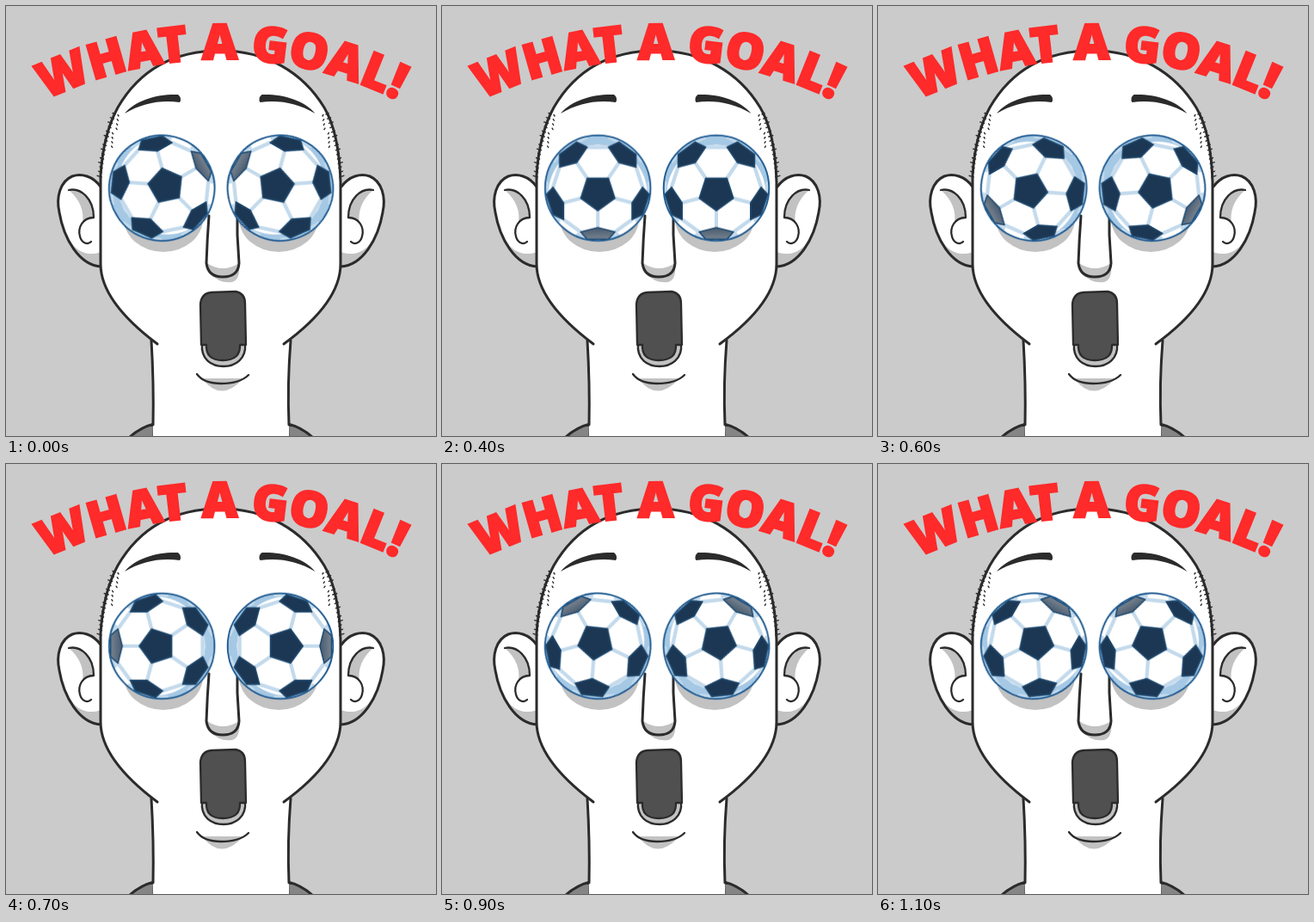
An HTML page that plays this animation: 500x500 px, repeating every 1.2 s.

```html
<!DOCTYPE html>
<html lang="en">
<head>
<meta charset="utf-8">
<title>What a goal!</title>
<style>
  html, body { margin: 0; width: 100%; height: 100%; overflow: hidden; background: #cbcbcb; }
  svg { display: block; width: 100vw; height: 100vh; }
  .line { fill: none; stroke: #2b2b2b; stroke-width: 3; stroke-linecap: round; stroke-linejoin: round; }
  .thin { stroke-width: 2.3; }
  .hair { stroke-width: 1.4; }
  .skin { fill: #fff; }
  .shade { fill: #c2c2c2; }
  .ink { fill: #2b2b2b; }
  .shout {
    font: 800 57px "Open Sans", "Noto Sans", sans-serif;
    text-anchor: middle;
    fill: #ff2a2a;
    stroke: #ff2a2a;
    stroke-width: 2.4;
  }
  .spin { animation: spin 1.2s steps(12, end) infinite; }
  @keyframes spin {
    from { transform: rotate(60deg); }
    to { transform: rotate(420deg); }
  }
</style>
</head>
<body>
<svg viewBox="0 0 500 500">
  <defs>
    <linearGradient id="leather" gradientUnits="userSpaceOnUse" x1="0" y1="-61" x2="0" y2="-34">
      <stop offset="0" stop-color="#7d8792"/>
      <stop offset="1" stop-color="#1c3753"/>
    </linearGradient>
    <clipPath id="rim"><circle r="61"/></clipPath>
    <path id="arc" d="M10 129A465 465 0 0 1 491 129"/>

    <g id="ball">
      <circle r="61.3" fill="#a5c8e4"/>
      <g clip-path="url(#rim)">
        <circle cy="-7" r="57.5" fill="#fff"/>
        <g fill="none">
          <path id="seams" stroke="#c3daec" stroke-width="4"/>
          <use href="#seams" style="stroke:#5486b0;stroke-width:1.5"/>
        </g>
        <path id="patches" fill="url(#leather)" stroke="#1f4a70" stroke-width="1.6" stroke-linejoin="round"/>
      </g>
      <circle r="61.3" fill="none" stroke="#1f5a90" stroke-width="1.9"/>
    </g>

    <g id="ear">
      <path class="skin" d="M112 211C101 198 88 194 77 198C63 204 58 222 62 240C67 270 85 302 112 303Z"/>
      <path class="shade" d="M73 214C87 211 102 224 102 246C96 246 92 249 89 254C91 239 87 226 73 214Z"/>
      <path class="shade" d="M76 276C87 289 98 290 112 286V303C98 303 85 294 76 276Z"/>
      <path class="line" d="M110 210C101 198 88 194 77 198C63 204 58 222 62 240C67 270 85 302 111 303"/>
      <path class="line thin" d="M73 214C87 211 102 224 102 246C89 246 83 258 86 268C88 276 95 278 99 274"/>
    </g>

    <path id="brow" class="ink" d="M138 125C151 109 177 102 200 103Q205 107 202 112C180 109 158 113 138 125Z"/>
  </defs>

  <rect width="500" height="500" fill="#cbcbcb"/>

  <path class="line" style="fill:#858585" d="M143 502Q156 490 172 486V502ZM357 502Q344 490 328 486V502Z"/>

  <use href="#ear"/>
  <use href="#ear" transform="translate(500 0) scale(-1 1)"/>

  <path class="skin" d="M171 502L169 387C140 364 110 334 110 300V197C112 166 118 140 130 118C155 75 195 52 249 52C303 52 345 77 370 118C383 140 388 168 389 205V300C389 334 360 366 331 389L329 502Z"/>
  <path class="line" d="M176 393C140 366 110 334 110 300V197C112 166 118 140 130 118C155 75 195 52 249 52C303 52 345 77 370 118C383 140 388 168 389 205V300C389 334 360 366 323 393"/>
  <path class="line" d="M169 389Q172 440 171 487M331 389Q327 440 329 487"/>
  <path id="stubble" class="line hair"/>

  <use href="#brow"/>
  <use href="#brow" transform="translate(497.5 0) scale(-1 1)"/>

  <path class="shade" d="M234 299Q252 311 271 299Q273 318 263 321Q248 323 237 311Z"/>
  <path class="line" d="M236 244Q234 270 233 299Q235 315 252 315Q270 315 271 299L269 266V244"/>

  <path class="shade" d="M228 392H278C280 411 266 419 253 419C239 419 226 411 228 392Z"/>
  <path class="line thin" d="M228 392C226 411 239 419 253 419C266 419 280 411 278 392"/>
  <path class="line thin" style="fill:#505050" d="M227 394L226 347Q227 334 239 333L267 332Q278 334 278 346L279 394H272Q273 412 252 412Q232 412 233 394Z"/>

  <path class="shade" d="M228 433Q250 462 276 433Z"/>
  <path class="line thin" d="M222 428Q230 439 250 439Q272 439 282 429"/>

  <ellipse class="shade" cx="183" cy="247" rx="46" ry="39"/>
  <ellipse class="shade" cx="317" cy="247" rx="46" ry="39"/>

  <g transform="translate(181.2 211.7)"><use href="#ball" class="spin"/></g>
  <g transform="translate(319 211.7) scale(-1 1)"><use href="#ball" class="spin"/></g>

  <text class="shout"><textPath href="#arc" startOffset="50%">WHAT A GOAL!</textPath></text>
</svg>
<script>
  const byId = id => document.getElementById(id);

  // Short hairs along both temples, with a few strays further in.
  let hairs = "";
  const hair = (x, y, len) => {
    hairs += `M${x} ${y}l${-len} -1.5M${499 - x} ${y}l${len} -1.5`;
  };
  for (let i = 0; i < 15; i++) {
    const y = 126 + i * 5.2;
    const x = 110 + 16 * ((202 - y) / 76) ** 1.6;
    hair(x + 1, y, 3 + i * 7 % 3);
    if (i < 8) hair(x + 5 + i * 5 % 4, y + 2, 1);
  }
  byId("stubble").setAttribute("d", hairs);

  // The ball is a truncated icosahedron, tilted a little and seen from the front.
  const RAD = Math.PI / 180;
  const R = 61, TILT = 0.095, POLE = Math.atan(2);
  const place = (polar, azimuth) => {
    const x = Math.sin(polar) * Math.sin(azimuth);
    const y = -Math.sin(polar) * Math.cos(azimuth);
    const z = Math.cos(polar);
    return [x, y * Math.cos(TILT) - z * Math.sin(TILT), y * Math.sin(TILT) + z * Math.cos(TILT)];
  };
  const hubs = [place(0, 0), place(Math.PI, 0)];
  for (let i = 0; i < 5; i++) {
    hubs.push(place(POLE, i * 72 * RAD), place(Math.PI - POLE, (i * 72 + 36) * RAD));
  }
  const dot = (a, b) => a[0] * b[0] + a[1] * b[1] + a[2] * b[2];
  const near = hub => hubs.filter(h => h !== hub && dot(h, hub) > 0.4);
  const corner = (a, b) => {
    const p = a.map((v, i) => 2 * v + b[i]);
    const len = Math.hypot(...p);
    return p.map(v => v / len * R);
  };
  const point = p => p[0].toFixed(1) + " " + p[1].toFixed(1);

  let patches = "", seams = "";
  for (const hub of hubs.filter(h => h[2] > 0)) {
    const ring = near(hub).map(n => corner(hub, n));
    const mid = [0, 1].map(i => ring.reduce((sum, p) => sum + p[i], 0) / 5);
    const turn = p => Math.atan2(p[1] - mid[1], p[0] - mid[0]);
    ring.sort((a, b) => turn(a) - turn(b));
    patches += "M" + ring.map(point).join("L") + "Z";
    for (const n of near(hub)) {
      seams += "M" + point(corner(hub, n)) + "L" + point(corner(n, hub));
    }
  }
  byId("patches").setAttribute("d", patches);
  byId("seams").setAttribute("d", seams);
</script>
</body>
</html>
```
